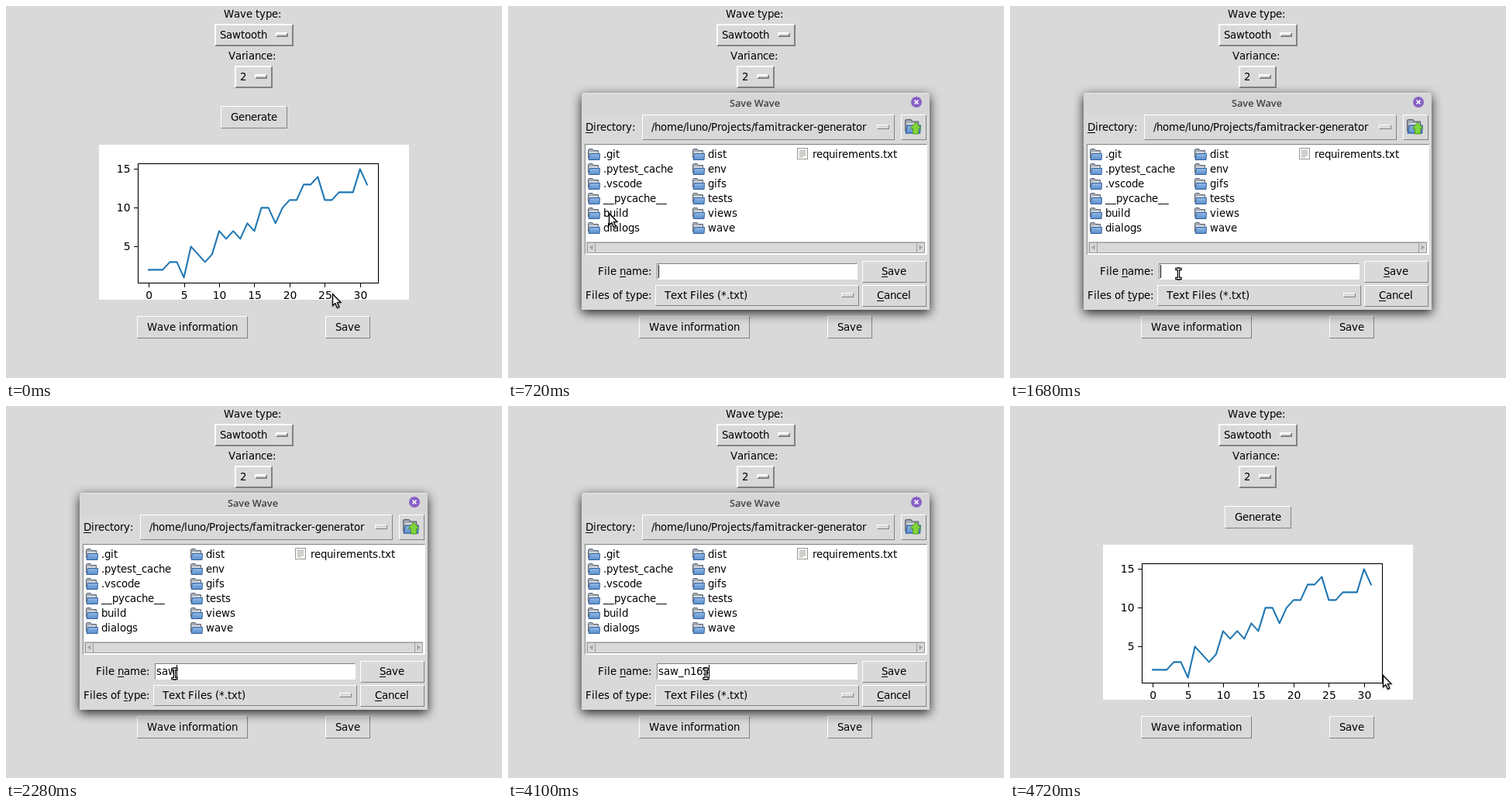
Animation of 640 by 480 pixels, one loop 4.8 s. Source, as an HTML page with a canvas:

```html
<!DOCTYPE html>
<html lang="en">
<head>
<meta charset="utf-8">
<title>Save wave</title>
<style>
html, body { margin: 0; width: 100%; height: 100%; overflow: hidden; background: #d9d9d9; }
canvas { display: block; }
</style>
</head>
<body>
<canvas id="stage" width="640" height="480"></canvas>
<script>
const LOOP = 4800, STEP = 20;
const BG = '#d9d9d9', HOVER = '#ececec', DARK = '#828282';
const UI = '13.33px "DejaVu Sans", sans-serif';
const WAVE = [2, 2, 2, 3, 3, 1, 5, 4, 3, 4, 7, 6, 7, 6, 8, 7,
  10, 10, 8, 10, 11, 11, 13, 13, 14, 11, 11, 12, 12, 12, 15, 13];
const FOLDERS = [
  ['.git', '.pytest_cache', '.vscode', '__pycache__', 'build', 'dialogs'],
  ['dist', 'env', 'gifs', 'tests', 'views', 'wave']
];

// [time, x, y, ease-out power]
const PATH = [
  [0, 421, 371], [300, 440, 415, 1.6], [560, 440, 415],
  [720, 130, 267, 1.6], [800, 130, 267], [1080, 217, 345, 1.8],
  [4060, 217, 345], [4420, 465, 345, 1.4], [4520, 481, 347, 1.4], [LOOP, 481, 347]
];
const TYPED = [[2180, 's'], [2240, 'sa'], [2280, 'saw'], [2920, 'saw_'],
  [3180, 'saw_n'], [3240, 'saw_n1'], [3380, 'saw_n16'], [3420, 'saw_n163']];
const FADE = [[0, 0], [560, .25], [580, .5], [600, .75], [620, .9], [640, 1],
  [4660, .7], [4680, .45], [4700, .2], [4720, 0]];

const stage = document.getElementById('stage').getContext('2d');
const layer = document.createElement('canvas');
layer.width = 640;
layer.height = 480;
const dialog = layer.getContext('2d');
let g = stage;

const at = (table, t, first) => table.reduce((v, [start, next]) => t >= start ? next : v, first);

function rect(x, y, w, h, fill) {
  g.fillStyle = fill;
  g.fillRect(x, y, w, h);
}

function poly(points, fill, stroke, width = 1) {
  g.beginPath();
  points.forEach(([x, y]) => g.lineTo(x, y));
  g.closePath();
  if (fill) { g.fillStyle = fill; g.fill(); }
  if (stroke) { g.strokeStyle = stroke; g.lineWidth = width; g.stroke(); }
}

// Whole-pixel advances, as in hinted toolkit text
const advance = ch => Math.round(g.measureText(ch).width);
function textWidth(s) {
  g.font = UI;
  return [...s].reduce((w, ch) => w + advance(ch), 0);
}

function text(s, x, y, mark = -1) {
  g.font = UI;
  g.textAlign = 'left';
  g.fillStyle = '#000';
  [...s].forEach((ch, i) => {
    const w = advance(ch);
    g.fillText(ch, x, y);
    if (i === mark) g.fillRect(x, y + 2, w, 1);
    x += w;
  });
}

const centered = (s, cx, y, mark) => text(s, Math.floor(cx - textWidth(s) / 2), y, mark);
const middle = (y, h) => y + Math.floor((h - 1) / 2);

function bevel(x, y, w, h, bd = 1, fill = BG, sunken = false) {
  rect(x, y, w, h, sunken ? '#fff' : DARK);
  poly([[x, y], [x + w, y], [x + w - bd, y + bd], [x + bd, y + bd],
    [x + bd, y + h - bd], [x, y + h]], sunken ? DARK : '#fff');
  rect(x + bd, y + bd, w - 2 * bd, h - 2 * bd, fill);
}

function button(label, x, y, w, h, { hover = false, down = false, mark } = {}) {
  bevel(x, y, w, h, 1, hover ? HOVER : BG, down);
  const off = down ? 1 : 0;
  centered(label, x + w / 2 + off, middle(y, h) + 5 + off, mark);
}

function option(label, x, y, w, h, bd, pad) {
  bevel(x, y, w, h, bd);
  text(label, x + pad, middle(y, h) + 5);
  bevel(x + w - 23, middle(y, h) - 3, 16, 6, bd);
}

function chart() {
  rect(120, 179, 400, 200, '#fff');
  const px = i => 184.1 + i * 9.09, py = v => 360.4 - v * 10;
  g.beginPath();
  WAVE.forEach((v, i) => g.lineTo(px(i), py(v)));
  g.strokeStyle = '#1f77b4';
  g.lineWidth = 2.08;
  g.lineJoin = 'round';
  g.lineCap = 'square';
  g.stroke();
  g.lineCap = 'butt';
  g.lineJoin = 'miter';
  g.strokeStyle = '#000';
  g.lineWidth = 1.1;
  g.strokeRect(170.5, 203.5, 310, 154);
  g.font = '13.89px "DejaVu Sans", sans-serif';
  g.textAlign = 'center';
  for (let i = 0; i <= 30; i += 5) {
    rect(Math.round(px(i)), 358, 1, 5, '#000');
    g.fillText(i, px(i) + .6, 378);
  }
  g.textAlign = 'right';
  for (let v = 5; v <= 15; v += 5) {
    rect(165, Math.round(py(v)), 5, 1, '#000');
    g.fillText(v, 160.5, py(v) + 5);
  }
}

function mainWindow(hover, down) {
  rect(0, 0, 640, 480, BG);
  centered('Wave type:', 318, 15);
  option('Sawtooth', 269, 23, 102, 29, 2, 7);
  centered('Variance:', 318, 69);
  option('2', 295, 77, 49, 29, 2, 7);
  button('Generate', 277, 129, 86, 29);
  chart();
  button('Wave information', 169, 400, 143, 29);
  button('Save', 412, 400, 58, 29, { hover, down });
}

function folder(x, y) {
  poly([[x + .5, y + 12], [x + .5, y + 1.5], [x + 1.5, y + .5], [x + 6, y + .5], [x + 7.5, y + 2.5],
    [x + 13.5, y + 2.5], [x + 13.5, y + 12]], '#a4abb4', '#5d6672');
  rect(x + 2, y + 4, 11, 2, '#d5d9de');
  const blue = g.createLinearGradient(0, y + 6, 0, y + 14);
  blue.addColorStop(0, '#94bdea');
  blue.addColorStop(1, '#5f90cd');
  poly([[x + 2.5, y + 6.5], [x + 15.5, y + 6.5], [x + 15, y + 14.5], [x + 1, y + 14.5]], blue, '#34619c');
}

function fileIcon(x, y) {
  rect(x, y, 14, 15, '#f4f4f1');
  g.strokeStyle = '#9a9a9a';
  g.lineWidth = 1;
  g.strokeRect(x + .5, y + .5, 13, 14);
  for (let i = 3; i < 13; i += 2) rect(x + 3, y + i, i > 10 ? 5 : 8, 1, '#aaa');
}

function upButton() {
  bevel(507, 140, 33, 33);
  g.save();
  g.translate(512, 146);
  g.scale(1.3, 1.25);
  folder(0, 0);
  g.restore();
  poly([[526, 150], [533, 158], [529.5, 158], [529.5, 165], [522.5, 165],
    [522.5, 158], [519, 158]], '#7fd63c', '#4a9a18');
}

function scrollBox(x, w) {
  rect(x, 305, w, 14, '#9c9c9c');
  rect(x + 1, 306, w - 2, 12, BG);
}

function scrollbar() {
  rect(101, 304, 437, 15, '#c3c3c3');
  scrollBox(102, 11);
  scrollBox(112, 416);
  scrollBox(527, 11);
  poly([[109.5, 308], [109.5, 315], [105, 311.5]], '#a3a3a3');
  poly([[530.5, 308], [530.5, 315], [535, 311.5]], '#a3a3a3');
}

function frame() {
  g.save();
  g.shadowColor = 'rgba(0,0,0,.85)';
  g.shadowBlur = 14;
  g.shadowOffsetY = 4;
  g.fillStyle = BG;
  g.beginPath();
  g.roundRect(95, 112, 449, 280, [3, 3, 0, 0]);
  g.fill();
  g.restore();
  rect(95, 114, 449, 26, '#d6d6d6');
  rect(97, 112, 445, 1, '#e6e6e6');
  g.font = '600 12.7px "Open Sans", "Noto Sans", sans-serif';
  g.textAlign = 'center';
  g.fillStyle = '#404040';
  g.fillText('Save Wave', 318.5, 130);
  g.beginPath();
  g.arc(527, 124, 7, 0, Math.PI * 2);
  g.fillStyle = '#8760c5';
  g.fill();
  g.beginPath();
  for (const s of [-1, 1]) {
    g.moveTo(524.5, 124 - 2.5 * s);
    g.lineTo(529.5, 124 + 2.5 * s);
  }
  g.strokeStyle = '#fff';
  g.lineWidth = 1.6;
  g.stroke();
}

function saveDialog(name, caret, hover, down) {
  g = dialog;
  g.clearRect(0, 0, 640, 480);
  frame();
  text('Directory:', 100, 161, 0);
  option('/home/luno/Projects/famitracker-generator', 173, 140, 326, 33, 1, 12);
  upButton();

  bevel(99, 178, 442, 143, 1, '#fff', true);
  FOLDERS.forEach((names, col) => names.forEach((label, row) => {
    const x = 103 + col * 135, y = 184 + row * 19;
    folder(x, y);
    text(label, x + 20, y + 12);
  }));
  fileIcon(373, 183);
  text('requirements.txt', 393, 196);
  scrollbar();

  text('File name:', 116, 347, 5);
  bevel(192, 332, 259, 21, 1, '#fff', true);
  text(name, 194, 347);
  if (caret) rect(194 + textWidth(name), 334, 1, 17, '#000');
  button('Save', 457, 329, 83, 28, { hover, down, mark: 0 });
  text('Files of type:', 100, 378, 9);
  option('Text Files (*.txt)', 190, 360, 263, 27, 1, 12);
  button('Cancel', 457, 360, 83, 28, { mark: 0 });
  g = stage;
}

function pointer(x, y, beam) {
  g.save();
  g.translate(x, y);
  if (beam) {
    g.lineCap = 'square';
    for (const [color, width] of [['#000', 3.4], ['#fff', 1]]) {
      g.beginPath();
      for (const end of [-6, 6]) {
        g.moveTo(-2, end + .5);
        g.lineTo(3, end + .5);
      }
      g.moveTo(.5, -6);
      g.lineTo(.5, 7);
      g.strokeStyle = color;
      g.lineWidth = width;
      g.stroke();
    }
  } else {
    g.shadowColor = 'rgba(0,0,0,.3)';
    g.shadowBlur = 2;
    g.shadowOffsetY = 1;
    poly([[.5, .5], [.5, 15.5], [3.8, 12.4], [6.4, 18.3], [9, 17.2], [6.4, 11.5], [11, 11.5]],
      '#fff', '#000', 1.2);
  }
  g.restore();
}

function mouse(t) {
  const i = PATH.findIndex(p => p[0] > t);
  const [t0, x0, y0] = PATH[i - 1], [t1, x1, y1, power = 1] = PATH[i];
  const p = 1 - (1 - (t - t0) / (t1 - t0)) ** power;
  return [Math.round(x0 + (x1 - x0) * p), Math.round(y0 + (y1 - y0) * p)];
}

const inside = ([mx, my], x, y, w, h) => mx >= x && mx < x + w && my >= y && my < y + h;

function draw(t) {
  const m = mouse(t), alpha = at(FADE, t, 0);
  mainWindow(inside(m, 412, 400, 58, 29), t >= 240 && t < 300);
  if (alpha) {
    const caret = (t - 600 + 540) % 540 < 360;
    saveDialog(at(TYPED, t, ''), caret, inside(m, 457, 329, 83, 28), t >= 4640);
    stage.globalAlpha = alpha;
    stage.drawImage(layer, 0, 0);
    stage.globalAlpha = 1;
  }
  pointer(...m, alpha > 0 && inside(m, 192, 332, 259, 21));
}

const start = performance.now();
function tick() {
  const t = (performance.now() - start) % LOOP;
  draw(Math.floor(t / STEP) * STEP);
  requestAnimationFrame(tick);
}
tick();
</script>
</body>
</html>
```
